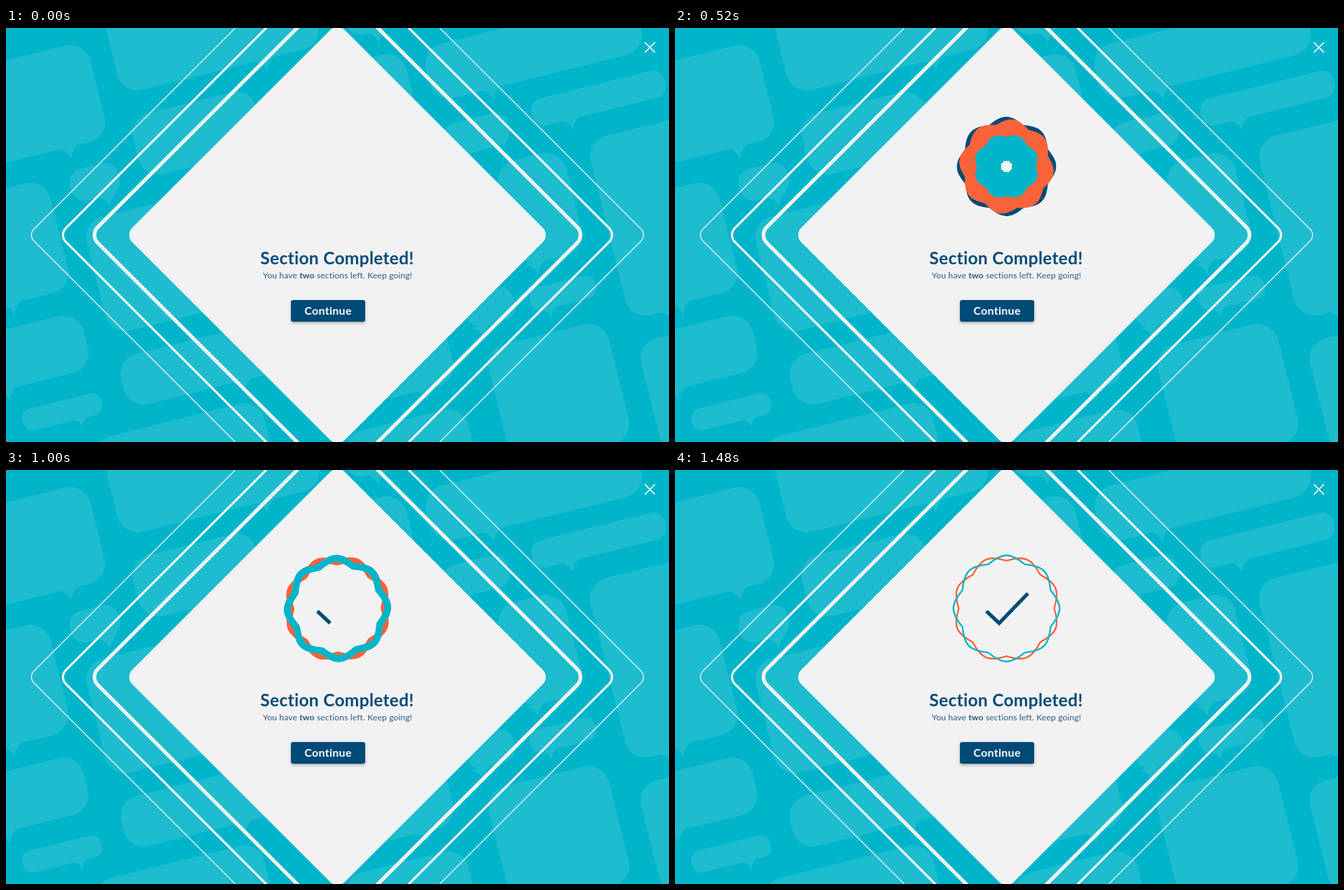
Recreate the animation shown at these times as an HTML page with a canvas. Size 947 by 592 pixels, loop 3880 ms.

```html
<!DOCTYPE html>
<html lang="en">
<head>
<meta charset="utf-8">
<title>Section Completed</title>
<style>
  html, body { margin: 0; width: 100%; height: 100%; overflow: hidden; background: #00b5ca; }
  canvas { display: block; }
</style>
</head>
<body>
<canvas id="stage" width="947" height="592"></canvas>
<script>
const canvas = document.getElementById('stage');
const ctx = canvas.getContext('2d');
const W = 947, H = 592, LOOP = 3880, STEP = 40;
const TEAL = '#00b5ca', PALE = '#1dbccf', NAVY = '#004a77', ORANGE = '#fa6339', PAPER = '#f2f2f2';
const TILT = -14 * Math.PI / 180, GAP = 34;
const MID = { x: 473.5, y: 296 }, BADGE = { x: 473.5, y: 198 };

const clamp = v => Math.min(1, Math.max(0, v));
const easeOut = (t, start, dur) => 1 - (1 - clamp((t - start) / dur)) ** 3;
const smooth = (t, start, dur) => {
  const x = clamp((t - start) / dur);
  return x * x * (3 - 2 * x);
};

// Speech bubble whose tail hangs straight down, towards the middle of the stage.
function bubble(x, y, w, h) {
  const tail = Math.min(18, h * 0.4);
  ctx.beginPath();
  ctx.roundRect(x, y, w, h, Math.min(30, h * 0.42));
  ctx.fill();
  ctx.save();
  ctx.translate(x + w * (x < MID.x - 30 ? 0.72 : 0.28), y + h);
  ctx.rotate(-TILT);
  ctx.beginPath();
  ctx.moveTo(0, tail);
  ctx.quadraticCurveTo(-tail * 0.2, tail * 0.3, -tail, tail * 0.2);
  ctx.lineTo(tail * 0.7, -tail * 0.3);
  ctx.quadraticCurveTo(tail * 0.1, tail * 0.2, 0, tail);
  ctx.fill();
  ctx.restore();
}

// Bubbles piled downwards with an even gap, flush with one edge.
function stack(edge, flush, top, ...sizes) {
  for (const [w, h] of sizes) {
    bubble(flush === 'left' ? edge : edge - w, top, w, h);
    top += h + GAP;
  }
}

function drawBubbles() {
  ctx.save();
  ctx.rotate(TILT);
  ctx.fillStyle = PALE;
  stack(106, 'right', 45, [204, 142], [72, 46]);
  stack(3, 'right', 222, [310, 162], [440, 84], [116, 32]);
  stack(138, 'left', -27, [296, 160], [182, 90]);
  stack(38, 'left', 295, [260, 168], [237, 74]);
  stack(223, 'right', 602, [250, 120]);
  stack(471, 'left', 73, [160, 60], [70, 120]);
  stack(504, 'right', 527, [160, 120], [180, 120]);
  stack(538, 'left', 530, [72, 48]);
  stack(568, 'left', 172, [312, 80], [95, 48]);
  stack(699, 'left', 282, [196, 40]);
  stack(728, 'right', 359, [100, 150], [96, 34], [177, 176]);
  stack(764, 'left', 357, [220, 264], [160, 165]);
  ctx.restore();
}

function diamond(half, radius) {
  const side = half * Math.SQRT2;
  ctx.save();
  ctx.translate(MID.x, MID.y);
  ctx.rotate(Math.PI / 4);
  ctx.beginPath();
  ctx.roundRect(-side / 2, -side / 2, side, side, radius);
  ctx.restore();
}

function drawDiamonds() {
  ctx.fillStyle = ctx.strokeStyle = PAPER;
  for (let i = 0; i < 3; i++) {
    diamond(353.7 + 44.2 * i, 16 - 2 * i);
    ctx.lineWidth = 5.2 - 1.95 * i;
    ctx.stroke();
  }
  diamond(303.5, 14.5);
  ctx.fill();
}

function setFont(font, spacing) {
  ctx.font = font + ' Lato, "Open Sans", sans-serif';
  ctx.letterSpacing = spacing + 'px';
}

// Centres a line made of [text, font] runs.
function textLine(runs, cx, y, color, spacing) {
  ctx.fillStyle = color;
  const widths = runs.map(([text, font]) => {
    setFont(font, spacing);
    return ctx.measureText(text).width;
  });
  let x = cx - widths.reduce((a, b) => a + b) / 2;
  runs.forEach(([text, font], i) => {
    setFont(font, spacing);
    ctx.fillText(text, x, y);
    x += widths[i];
  });
}

function drawButton() {
  ctx.save();
  ctx.shadowColor = 'rgba(0,0,0,.3)';
  ctx.shadowBlur = 4;
  ctx.shadowOffsetY = 2;
  ctx.fillStyle = NAVY;
  ctx.beginPath();
  ctx.roundRect(407, 389, 106, 31, 3);
  ctx.fill();
  ctx.restore();
  textLine([['Continue', 'bold 16px']], 460, 410, '#fff', 0.3);
}

function drawClose() {
  ctx.strokeStyle = '#fff';
  ctx.lineWidth = 1.6;
  ctx.beginPath();
  ctx.moveTo(912.5, 20.5);
  ctx.lineTo(927, 35);
  ctx.moveTo(927, 20.5);
  ctx.lineTo(912.5, 35);
  ctx.stroke();
}

function drawScene() {
  ctx.fillStyle = TEAL;
  ctx.fillRect(0, 0, W, H);
  drawBubbles();
  drawDiamonds();
  drawClose();
  textLine([['Section Completed!', 'bold 24.5px']], 473, 337.5, NAVY, 0.3);
  const plain = '12.2px', bold = 'bold 12.2px';
  textLine([['You have ', plain], ['two', bold], [' sections left. Keep going!', plain]],
    473.5, 358, '#2a5a80', 0.1);
  drawButton();
}

// Eight rounded lobes meeting in sharp valleys.
function scallop(radius, angle) {
  const step = Math.PI / 4, valley = radius * 0.9;
  const chord = valley * Math.cos(step / 2), side = valley * Math.sin(step / 2);
  const top = chord + (radius - chord) * 4 / 3, spread = radius * 0.066;
  ctx.save();
  ctx.translate(BADGE.x, BADGE.y);
  ctx.rotate(angle);
  ctx.beginPath();
  ctx.moveTo(-side, -chord);
  for (let i = 0; i < 8; i++) {
    ctx.bezierCurveTo(-spread, -top, spread, -top, side, -chord);
    ctx.rotate(step);
  }
  ctx.closePath();
  ctx.restore();
}

// Each ring grows, opens in the middle and turns by one lobe as it settles.
const rings = [
  { color: NAVY, size: [76.4, 75.4], grow: [36, 820], open: [250, 900], turn: [36, 600], rest: 0 },
  { color: ORANGE, size: [77.2, 74.7], grow: [170, 690], open: [400, 1050], turn: [170, 1100], rest: 22.5 },
  { color: TEAL, size: [77.2, 74.7], grow: [298, 830], open: [470, 1010], turn: [298, 1100], rest: 0 }
];

function drawRing(t, { color, size, grow, open, turn, rest }) {
  const outer = size[0] * easeOut(t, ...grow);
  const inner = size[1] * easeOut(t, ...open);
  if (!outer) return;
  const angle = (rest - 45 * (1 - easeOut(t, ...turn))) * Math.PI / 180;
  ctx.save();
  scallop(outer, angle);
  ctx.clip();
  scallop((outer + inner) / 2, angle);
  ctx.strokeStyle = color;
  ctx.lineWidth = outer - inner;
  ctx.lineJoin = 'round';
  ctx.stroke();
  ctx.restore();
}

function drawCheck(t) {
  const a = [444.8, 201.8], b = [463, 219], c = [504, 176.5];
  const first = easeOut(t, 690, 300), second = smooth(t, 1080, 400);
  if (!first) return;
  const along = (p, q, k) => ctx.lineTo(p[0] + (q[0] - p[0]) * k, p[1] + (q[1] - p[1]) * k);
  ctx.beginPath();
  ctx.moveTo(...a);
  along(a, b, first);
  if (second) along(b, c, second);
  ctx.strokeStyle = NAVY;
  ctx.lineWidth = 5.2;
  ctx.lineJoin = 'miter';
  ctx.stroke();
}

function frame() {
  const t = Math.floor((performance.now() % LOOP) / STEP) * STEP;
  drawScene();
  rings.forEach(ring => drawRing(t, ring));
  drawCheck(t);
  requestAnimationFrame(frame);
}
frame();
</script>
</body>
</html>
```
